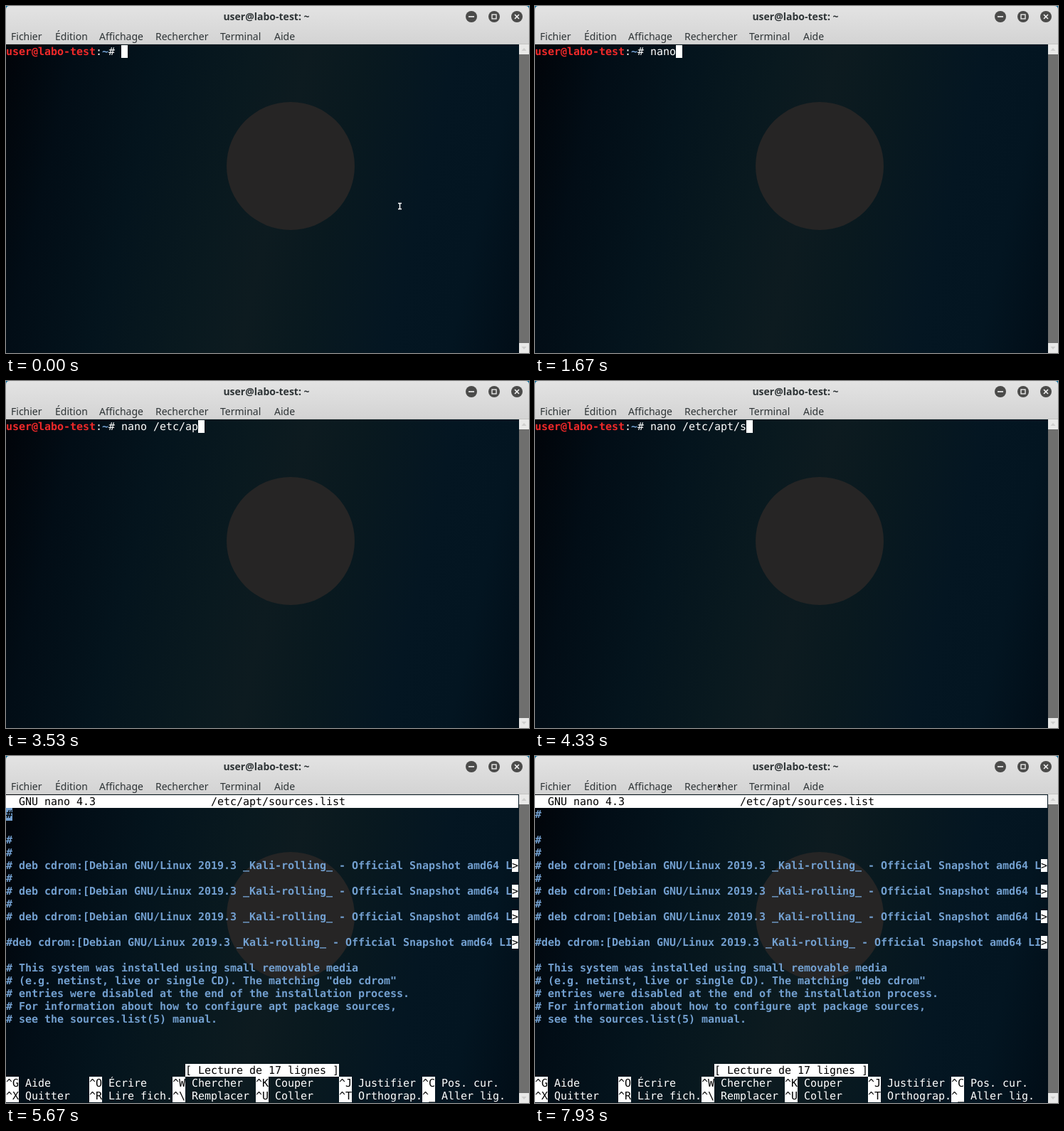
Write an HTML page that moves like this. It is 735 px wide and 488 px high and loops after 8000 ms.

```html
<!DOCTYPE html>
<html lang="fr">
<head>
<meta charset="utf-8">
<title>Terminal</title>
<style>
  html, body { margin: 0; width: 100%; height: 100%; overflow: hidden; }
  body { position: relative; background: #000; }
  #stage { position: absolute; left: 0; top: 0; width: 735px; height: 488px; overflow: hidden; }
  #back {
    position: absolute; left: 0; top: 54px; width: 721px; height: 434px;
    background: linear-gradient(103deg, #010409 0%, #020d16 12%, #04141d 27%, #09191f 42%,
      #0d1b20 52%, #09191f 62%, #041622 77%, #031521 88%, #010d17 100%);
  }
  svg { position: absolute; left: 0; top: 0; }
  svg text { font: 14px "Noto Sans", "Open Sans", sans-serif; fill: #2e3436; }
  svg .title { font-weight: 700; text-anchor: middle; }
  .screen { position: absolute; left: 0; top: 55px; width: 721px; height: 433px; overflow: hidden; }
  .cell {
    position: absolute; height: 18px; line-height: 18px; white-space: pre; color: #fff;
    font-family: "DejaVu Sans Mono", monospace; font-size: 15px; letter-spacing: -.031px;
    text-rendering: geometricPrecision;
  }
  .red { color: #ef2929; font-weight: 700; }
  .blue { color: #729fcf; font-weight: 700; }
  .inv { background: #fff; color: #000; }
  .cursor { background: #fff; width: 9px; }
  .block { background: #729fcf; color: #02070c; font-weight: 700; }
</style>
</head>
<body>
<div id="stage">
  <div id="back"></div>
  <svg width="735" height="488">
    <defs>
      <linearGradient id="bar" x2="0" y2="1">
        <stop offset="0" stop-color="#e3e3e3"/>
        <stop offset="1" stop-color="#d3d3d3"/>
      </linearGradient>
    </defs>
    <circle cx="400" cy="225" r="90" fill="#262525"/>
    <rect width="735" height="54" fill="#0b6f9e"/>
    <path d="M0 54V5Q0 0 5 0H730Q735 0 735 5V54Z" fill="url(#bar)"/>
    <path d="M0 53.5H735" stroke="#c4c4c2"/>
    <text class="title" x="366" y="20">user@labo-test: ~</text>
    <g id="menu"></g>
    <g fill="#4b4b4a">
      <circle cx="654" cy="15" r="8"/>
      <circle cx="686" cy="15" r="8"/>
      <circle cx="718" cy="15" r="8"/>
    </g>
    <g fill="none" stroke="#f4f4f4" stroke-width="1.6">
      <path d="M650 15H658"/>
      <rect x="683" y="12" width="6" height="6" stroke-width="1.3"/>
      <path d="M715 12L721 18M721 12L715 18"/>
    </g>
    <rect x="721" y="54" width="14" height="434" fill="#e9e9e8"/>
    <rect x="721" y="68" width="14" height="406" fill="#6f6f6e"/>
    <path d="M724.5 63L728 59L731.5 63ZM724.5 479L728 483L731.5 479Z" fill="#cfcfce"/>
  </svg>
  <div class="screen" id="shell"></div>
  <div class="screen" id="nano"></div>
  <svg width="735" height="488">
    <path id="beam" d="M-2.5 -4H2.5M-2.5 4H2.5M0 -4V4" fill="none" stroke="#fff" stroke-width="1.5"/>
    <path id="arrow" d="M0 0V8L2 6.3L3.4 9L4.8 8.3L3.5 5.6H6Z" fill="#111" stroke="#fff" stroke-width=".7"/>
  </svg>
</div>
<script>
const LOOP = 8000, CW = 9, RH = 18;
const $ = id => document.getElementById(id);
const shell = $('shell'), nano = $('nano');

function put(screen, row, col, text, cls = '') {
  const el = document.createElement('div');
  el.className = 'cell ' + cls;
  el.textContent = text;
  el.style.left = col * CW + 'px';
  el.style.top = row * RH + 'px';
  if (cls === 'inv') el.style.width = text.length * CW + 'px';
  screen.append(el);
  return el;
}

const menu = [['Fichier', 7], ['Édition', 69], ['Affichage', 131],
  ['Rechercher', 210], ['Terminal', 301], ['Aide', 377]];
for (const [label, x] of menu) {
  const el = document.createElementNS('http://www.w3.org/2000/svg', 'text');
  el.setAttribute('x', x);
  el.setAttribute('y', 48);
  el.textContent = label;
  $('menu').append(el);
}

// Shell prompt
put(shell, 0, 0, 'user@labo-test', 'red');
put(shell, 0, 14, ':');
put(shell, 0, 15, '~', 'blue');
put(shell, 0, 16, '#');
const typed = put(shell, 0, 18, '');
const caret = put(shell, 0, 18, '', 'cursor');

// Editor screen
put(nano, 0, 0, ('  GNU nano 4.3'.padEnd(32) + '/etc/apt/sources.list').padEnd(80), 'inv');
const cdrom = 'deb cdrom:[Debian GNU/Linux 2019.3 _Kali-rolling_ - Official Snapshot amd64 LI';
const deb = '# ' + cdrom;
const lines = ['#', '', '#', '#', deb, '#', deb, '#', deb, '', '#' + cdrom, '',
  '# This system was installed using small removable media',
  '# (e.g. netinst, live or single CD). The matching "deb cdrom"',
  '# entries were disabled at the end of the installation process.',
  '# For information about how to configure apt package sources,',
  '# see the sources.list(5) manual.'];
lines.forEach((line, i) => {
  put(nano, i + 1, 0, line.slice(0, 79), 'blue');
  if (line.includes(cdrom)) put(nano, i + 1, 79, '>', 'inv');
});
put(nano, 21, 28, '[ Lecture de 17 lignes ]', 'inv');
const keys = [
  ['^G Aide', '^O Écrire', '^W Chercher', '^K Couper', '^J Justifier', '^C Pos. cur.'],
  ['^X Quitter', '^R Lire fich.', '^\\ Remplacer', '^U Coller', '^T Orthograp.', '^_ Aller lig.']];
keys.forEach((row, r) => row.forEach((key, c) => {
  put(nano, 22 + r, c * 13, key.slice(0, 2), 'inv');
  put(nano, 22 + r, c * 13 + 3, key.slice(3));
}));
const onHash = put(nano, 1, 0, '#', 'block');
const onBlank = put(nano, 2, 0, '', 'cursor');

// Key times; the last one is a completion that fills in the rest
const command = 'nano /etc/apt/sources.list';
const strokes = [1200, 1330, 1530, 1670, 1930, 2200, 2470, 2670, 2730, 3130, 3330, 3530,
  3730, 3930, 4330, 4530, 4600, 4670, 4870, 5000];
const OPEN = 5670;

// [time, shape, x, y]
const pointer = [
  [0, 'beam', 553.5, 281.5], [70, 'beam', 454.5, 187.5], [1270, ''],
  [7670, 'beam', 444.5, 186.5], [7730, 'beam', 392, 128], [7800, 'beam', 322, 68],
  [7870, 'arrow', 276, 28], [7930, 'arrow', 257, 38]];

const show = (el, on) => { el.style.visibility = on ? 'visible' : 'hidden'; };

function draw(t) {
  const hits = strokes.filter(s => s <= t).length;
  const count = hits === strokes.length ? command.length : hits;
  const inShell = t < OPEN;
  shell.style.display = inShell ? '' : 'none';
  nano.style.display = inShell ? 'none' : '';
  typed.textContent = command.slice(0, count);
  caret.style.left = (18 + count) * CW + 'px';
  show(caret, t < 5530);
  show(onHash, t < 6270 || (t >= 6870 && t < 7130));
  show(onBlank, t >= 7130 && t < 7730);

  const [, shape, x, y] = pointer.filter(p => p[0] <= t).pop();
  for (const id of ['beam', 'arrow']) {
    show($(id), id === shape);
    if (id === shape) $(id).setAttribute('transform', `translate(${x} ${y})`);
  }
}

const start = performance.now();
function tick() {
  draw((performance.now() - start) % LOOP);
  requestAnimationFrame(tick);
}
draw(0);
requestAnimationFrame(tick);
</script>
</body>
</html>
```
